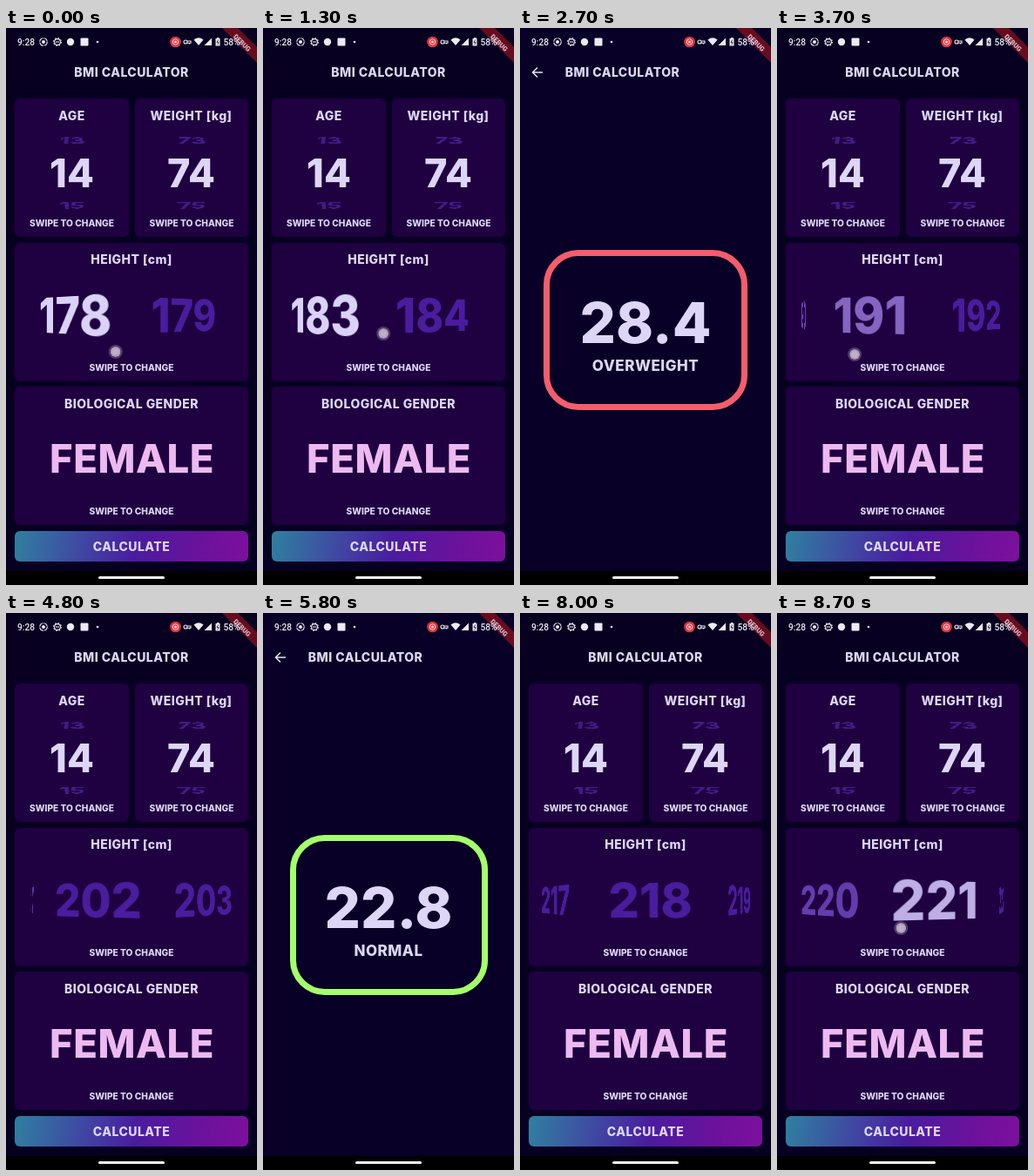
These frames come from a looping animation (288x640 px, 8800 ms). An HTML page:

```html
<!DOCTYPE html>
<html lang="en">
<head>
<meta charset="utf-8">
<title>BMI calculator</title>
<style>
html, body { margin: 0; width: 100%; height: 100%; overflow: hidden; background: #080025; }
#stage { position: absolute; left: 0; top: 0; width: 288px; height: 640px; overflow: hidden;
  background: #070021; color: #ddd6f6; font-family: Inter, "Open Sans", sans-serif; font-weight: 800; }
.page, svg { position: absolute; left: 0; top: 0; width: 288px; height: 640px; }
#result { background: #080026; }
.card { position: absolute; background: #1f0040; border-radius: 6px; box-shadow: 0 0 6px #1a003855; }
.button { background: linear-gradient(100deg, #2f80a0, #3f4aa2 28%, #4a1c9f 52%, #6a129c 78%, #7c109c); }
.text { position: absolute; line-height: 1; white-space: nowrap; transform: translate(-50%, -50%); }
.title { font-size: 14px; letter-spacing: .45px; }
.hint { font-size: 10.2px; }
.small { font-size: 45px; }
.big { font-size: 65px; }
.gender { font-size: 45.5px; letter-spacing: .5px; color: #ecb9f0; }
.verdict { font-size: 17px; letter-spacing: .5px; }
.dim { color: #421b86; }
#frame { position: absolute; top: 255px; height: 170px; border: 7px solid; border-radius: 40px; }
#finger { position: absolute; left: -8px; top: -8px; width: 12px; height: 12px; border-radius: 50%;
  background: radial-gradient(#e2d8e6d0 35%, #b5a8bbb8) padding-box; border: 2px solid #9d8fb466; }
</style>
</head>
<body>
<div id="stage">
  <div class="page" id="form"></div>
  <div class="page" id="result">
    <svg viewBox="0 0 288 640" fill="none" stroke="#e8e2fa" stroke-width="1.5">
      <path d="M26 51H14.5M20 45.5L14.5 51l5.5 5.5"/>
    </svg>
    <div id="frame"></div>
  </div>
  <div id="finger"></div>
  <svg viewBox="0 0 288 640">
    <path d="M248 0h18L288 22v18z" fill="#800f1e" fill-opacity=".8"/>
    <text transform="translate(271 17) rotate(45)" y="2.6" text-anchor="middle" fill="#d8bccb"
      font-family="Roboto, sans-serif" font-size="7.6" font-weight="900">DEBUG</text>
    <g fill="#eeeaf5" font-family="Roboto, sans-serif" font-size="10.2" font-weight="500">
      <text x="13" y="19.6">9:28</text>
      <text x="249.5" y="19.6">58%</text>
      <circle cx="43" cy="16" r="2"/>
      <circle cx="74" cy="16" r="4.2"/>
      <rect x="85.5" y="11.5" width="9" height="9" rx="1"/>
      <circle cx="105" cy="16" r="1.3"/>
      <path d="M215.5 13.5q5.5-4.5 11 0L221 20zM236 11.5V20h-8.5z"/>
      <path d="M242 11h2.5v1h1v8.5h-5V12H242z"/>
    </g>
    <path d="M243.7 13.5l-1.7 3h2l-1.2 2.7" stroke="#111" fill="none" stroke-width=".8"/>
    <g fill="none" stroke="#eeeaf5" stroke-width="1.1">
      <circle cx="43" cy="16" r="4.2" stroke-dasharray="5.6 1"/>
      <circle cx="59" cy="16" r="3.4"/>
      <circle cx="59" cy="16" r="4.4" stroke-dasharray="1.7 1.75"/>
      <path d="M57 16h4"/>
      <circle cx="206" cy="16" r="2"/>
      <path d="M208 15h4v2.2h-4M210.5 17v1.5"/>
    </g>
    <circle cx="194.5" cy="16" r="6.3" fill="#df3340"/>
    <circle cx="194.5" cy="16" r="3.3" fill="none" stroke="#ffd5d8"/>
    <circle cx="194.5" cy="16" r="1.5" fill="#ffd5d8"/>
    <path d="M0 624h288v16H0z"/>
    <rect x="106" y="630" width="76" height="3" rx="1.5" fill="#f4f2f6"/>
  </svg>
</div>
<script>
const $ = id => document.getElementById(id);
const form = $('form'), result = $('result'), frame = $('frame'), finger = $('finger');
const LOOP = 8800, PAGE = 126;

const clamp = v => Math.max(0, Math.min(1, v));
const smooth = v => { v = clamp(v); return v * v * (3 - 2 * v); };

function add(parent, cls, css) {
  const el = parent.appendChild(document.createElement('div'));
  el.className = cls;
  Object.assign(el.style, css);
  return el;
}
function text(parent, cls, x, y, str) {
  const el = add(parent, 'text ' + cls, { left: x + 'px', top: y + 'px' });
  el.textContent = str;
  return el;
}
function card(x, y, w, h, cls = '') {
  add(form, 'card ' + cls, { left: x + 'px', top: y + 'px', width: w + 'px', height: h + 'px' });
}
function smallWheel(x, value) {
  text(form, 'small', x, 166, value);
  for (const side of [-1, 1]) {
    text(form, 'small dim', x, 166 + side * 37.5, value + side).style.transform =
      `translate(-50%, -50%) perspective(100px) translateZ(-70px) rotateX(${-66 * side}deg)`;
  }
}

card(10, 81, 131, 159);
card(148, 81, 130, 159);
card(10, 247, 268, 159);
card(10, 412, 268, 159);
card(10, 578, 268, 35, 'button');
text(form, 'title', 144, 51, 'BMI CALCULATOR');
text(form, 'title', 75.5, 100.5, 'AGE');
text(form, 'title', 212.5, 100.5, 'WEIGHT [kg]');
text(form, 'title', 144, 266, 'HEIGHT [cm]');
text(form, 'title', 144, 431.5, 'BIOLOGICAL GENDER');
text(form, 'title', 144, 595.5, 'CALCULATE');
for (const [x, y] of [[75.5, 224], [213, 224], [144, 389.5], [144, 555]])
  text(form, 'hint', x, y, 'SWIPE TO CHANGE');
text(form, 'gender', 144.5, 495, 'FEMALE');
smallWheel(75.5, 14);
smallWheel(212.5, 74);
const items = [0, 1, 2, 3].map(() => text(form, 'big', 143.5, 330, ''));

text(result, 'title', 117.5, 51, 'BMI CALCULATOR');
const score = text(result, 'big', 144, 338, '');
const verdict = text(result, 'verdict', 144, 387.5, '');

// start, duration, from, to, finger x, finger y
const swipes = [
  [-167, 500, 178, 180, 192, 372],
  [450, 550, 180, 183, 220, 364],
  [1119, 500, 183, 185, 214, 351],
  [1640, 440, 185, 190, 235, 362],
  [3475, 500, 190, 193, 251, 375],
  [4000, 450, 193, 198, 240, 368],
  [4470, 510, 198, 204, 240, 365],
  [7400, 360, 204, 212, 240, 366],
  [7780, 330, 212, 220, 240, 364],
  [8120, 900, 220, 221, 232, 362]
];
// start, x, y
const taps = [[2100, 150, 596], [3100, 20, 51], [5060, 150, 596], [6900, 20, 51]];
// open, close, score, verdict, colour, left, inner width
const results = [
  [2180, 3170, '28.4', 'OVERWEIGHT', '#f55d6c', 27, 220],
  [5140, 6970, '22.8', 'NORMAL', '#a4ff6a', 30.5, 213]
];

function heightAt(t) {
  let p = swipes[0][2];
  for (const [start, dur, from, to] of swipes)
    if (t >= start) p = from + (to - from) * smooth((t - start) / dur);
  return p;
}

// How far n has become the selected value; selection trails the scroll a little.
function selected(n, t) {
  const delays = [80, 95, 110, 125, 140];
  return delays.filter(d => Math.round(heightAt(t - d)) === n).length / delays.length;
}

function mix(k) {
  const [a, b] = [[74, 28, 158], [218, 211, 248]];
  return `rgb(${a.map((v, i) => Math.round(v + (b[i] - v) * k))})`;
}

function drawWheel(t) {
  const p = heightAt(t);
  items.forEach((el, i) => {
    const n = Math.floor(p) - 1 + i, d = n - p;
    const angle = d * 70.4, rad = angle * Math.PI / 180;
    const k = selected(n, t) * clamp(1.6 - Math.abs(d));
    el.style.display = Math.abs(d) < 1.32 ? '' : 'none';
    el.textContent = n;
    el.style.color = mix(k);
    el.style.transform = `translate(-50%, -50%) translateX(${114 * Math.sin(rad)}px) perspective(280px) ` +
      `translateZ(${-110 * (1 - Math.cos(rad))}px) rotateY(${angle * .95}deg) scale(${.85 + .15 * k})`;
  });
}

function drawFinger(t) {
  let spot = null;
  for (const [start, dur, from, , x0, y] of swipes) {
    const u = (t - start) / dur, x = x0 - PAGE * (heightAt(t) - from);
    if (u >= 0 && u < .75 && x > 60) spot = [x, y];
  }
  for (const [start, x, y] of taps)
    if (t >= start && t < start + 110) spot = [x, y];
  finger.style.display = spot ? '' : 'none';
  if (spot) finger.style.transform = `translate(${spot[0]}px, ${spot[1]}px)`;
}

function drawResult(t) {
  const [open, close, value, label, color, left, width] = results[t < 4500 ? 0 : 1];
  const k = smooth((t - open) / 280) * (1 - smooth((t - close) / 260));
  result.style.display = k ? '' : 'none';
  result.style.opacity = k;
  result.style.transform = `scale(${.85 + .15 * k})`;
  score.textContent = value;
  verdict.textContent = label;
  Object.assign(frame.style, { borderColor: color, left: left + 'px', width: width + 'px' });
}

const begin = performance.now();
function draw(now) {
  const t = Math.max(0, now - begin) % LOOP;
  drawWheel(t);
  drawFinger(t);
  drawResult(t);
  requestAnimationFrame(draw);
}
draw(begin);
</script>
</body>
</html>
```
